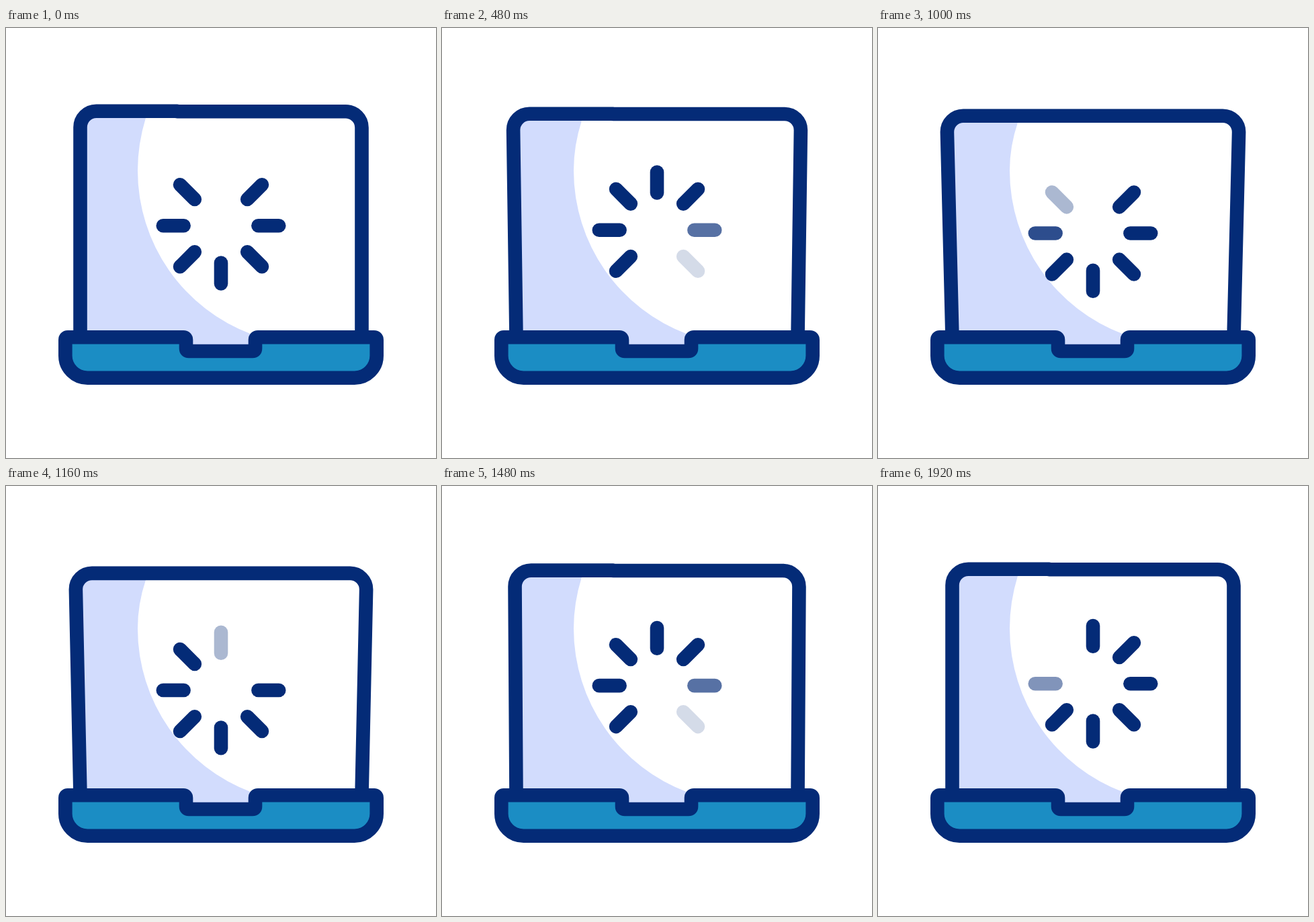
An HTML page for the animation above (1960 ms loop, 640 px wide and 640 px high).

```html
<!DOCTYPE html>
<html lang="en">
<head>
<meta charset="utf-8">
<title>Laptop loading</title>
<style>
  html, body { margin: 0; width: 100%; height: 100%; overflow: hidden; background: #fff; }
  svg { display: block; width: 100%; height: 100%; }
  .line { fill: none; stroke: #042b77; stroke-width: 20.6; stroke-linecap: round; stroke-linejoin: round; }
  #shade { fill: #d2dcfd; }
  #base { fill: #1b8dc4; }
</style>
</head>
<body>
<svg viewBox="0 0 640 640">
  <path id="shade"/>
  <path id="lid" class="line"/>
  <path id="base" class="line" d="M92 460.3H264q4 0 4 4V477q0 4 4 4H367q4 0 4-4V464.3q0-4 4-4H547.7q4 0 4 4V487.7a33 33 0 0 1-33 33H121.3a33 33 0 0 1-33-33V464.3q0-4 3.7-4Z"/>
  <g id="spinner"></g>
</svg>
<script>
  const LOOP = 1960, STEP = 40, CYCLE = 1000;
  const [shade, lid, spinner] = ['shade', 'lid', 'spinner'].map(id => document.getElementById(id));

  const bars = Array.from({ length: 8 }, (_, i) => {
    const bar = document.createElementNS('http://www.w3.org/2000/svg', 'path');
    bar.setAttribute('class', 'line');
    bar.setAttribute('d', 'M0-55.4V-86.2');
    bar.setAttribute('transform', `translate(320 294.2) rotate(${i * 45})`);
    return spinner.appendChild(bar);
  });

  const clamp = x => Math.min(1, Math.max(0, x));
  const smooth = (t, start) => {
    const x = clamp((t - start) / 720);
    return x * x * (3 - 2 * x);
  };

  // Each bar vanishes in turn, stays hidden for 80 ms, then fades in over 240 ms.
  function barOpacity(t, i) {
    let age = t - i * 120;
    if (age < 0) return 1;
    age %= CYCLE;
    return clamp((age - 80) / 240);
  }

  function draw(t) {
    const tilt = smooth(t, 80) - smooth(t, 1000);
    const left = 110.5 - 7.6 * tilt, right = 640 - left;
    const top = 123.8 + 6.9 * tilt, side = top + 24;
    const step = 0.5 * (1 - tilt);
    const corner = `M110.5 460L${left} ${side}A24 24 0 0 1 ${left + 24} ${top}`;

    lid.setAttribute('d', `${corner}H255v${step}H${right - 24}A24 24 0 0 1 ${right} ${side + step}L529.5 460`);
    shade.setAttribute('d', `${corner}H211L208 ${top + 10}Q196 ${173 + 3 * tilt} 196 212` +
      'A260 260 0 0 0 366 456V481H268V460Z');
    spinner.setAttribute('transform', `translate(0 ${11.3 * tilt})`);
    bars.forEach((bar, i) => bar.setAttribute('opacity', barOpacity(t, i)));
  }

  function tick() {
    draw(Math.floor(performance.now() % LOOP / STEP) * STEP);
    requestAnimationFrame(tick);
  }
  tick();
</script>
</body>
</html>
```
